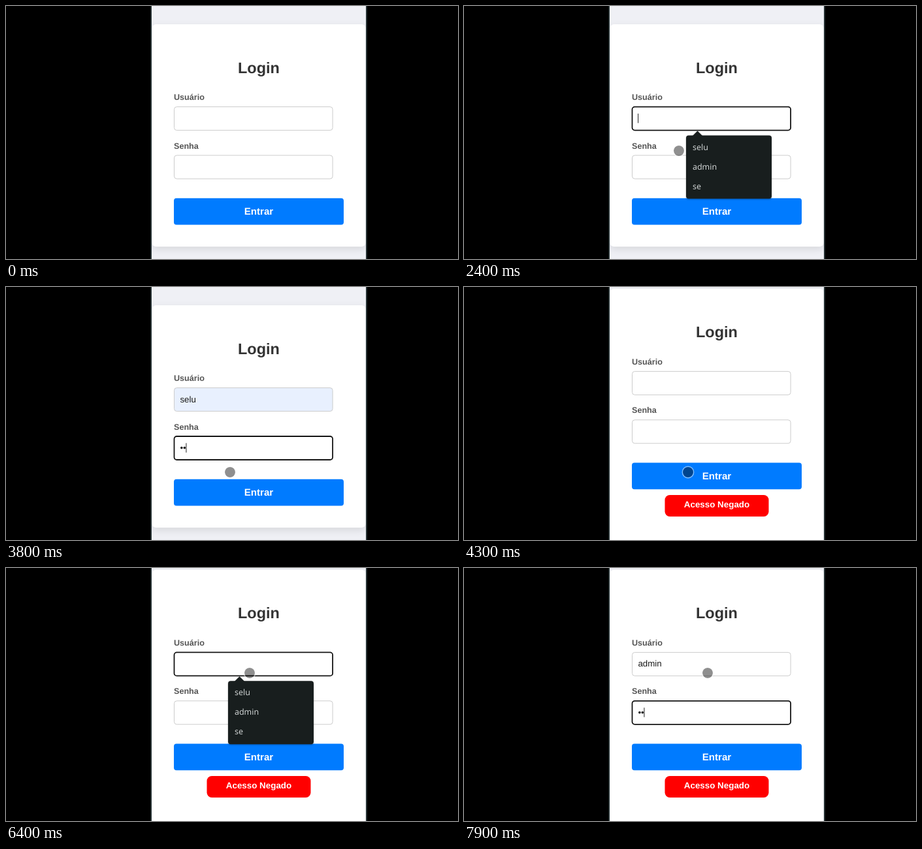
Write an HTML page that moves like this. It is 692 px wide and 388 px high and loops after 8 s.

```html
<!DOCTYPE html>
<html lang="pt-BR">
<head>
<meta charset="utf-8">
<title>Login</title>
<style>
  html, body { margin: 0; height: 100%; overflow: hidden; background: #000; }
  svg { display: block; width: 100vw; height: 100vh; }
  text { font-family: "Liberation Sans", Arial, sans-serif; font-size: 13.3px; fill: #1a1a1a; text-rendering: geometricPrecision; }
  .bold { font-weight: bold; }
  .mid { text-anchor: middle; }
  .label { font-weight: bold; font-size: 12.6px; fill: #555; }
  .card { fill: #fff; filter: drop-shadow(0 4px 6px rgba(0, 0, 0, .1)); }
  .box { fill: #fff; stroke: #ccc; }
  .box.filled { fill: #e8f0fe; }
  .box.focus { stroke: #141414; stroke-width: 1.8; }
  .menu { fill: #181e1e; filter: drop-shadow(0 1px 1px rgba(0, 0, 0, .3)); }
  .menu text, .preview { font-family: "Open Sans", "Noto Sans", sans-serif; font-size: 12.5px; }
  .menu text { fill: #dadede; }
</style>
</head>
<body>
<svg viewBox="0 0 692 388">
  <defs><clipPath id="screen"><path d="M223 0H551V388H223z"/></clipPath></defs>
  <path d="M221.3 0H552.8V388H221.3z" fill="#2d393b"/>
  <g clip-path="url(#screen)">
    <path d="M223 0H551V388H223z" fill="#eff0f5"/>
    <g id="page">
      <rect id="card" class="card" x="223.5" y="28" width="327" height="341" rx="6"/>
      <text class="bold mid" x="387" y="102.7" style="font-size:23.5px;fill:#333">Login</text>
      <text class="label" x="257" y="144.3">Usuário</text>
      <text class="label" x="257" y="218.6">Senha</text>
      <g id="fields"></g>
      <rect x="257" y="294.8" width="260" height="40.6" rx="4" fill="#007bff"/>
      <text class="bold mid" x="387" y="320" style="font-size:15.1px;fill:#fff">Entrar</text>
      <g id="denied">
        <rect x="307.5" y="344.2" width="159" height="33" rx="7.5" fill="#f00"/>
        <text class="bold mid" x="387" y="363.7" style="font-size:13.4px;fill:#fff">Acesso Negado</text>
      </g>
      <path id="caret" stroke="#222" d="M0 0V14.5"/>
    </g>
    <g id="cursor">
      <circle r="8" fill="rgba(0,0,0,.44)"/>
      <circle r="8.7" fill="none" stroke="rgba(255,255,255,.5)" stroke-width="1.4"/>
    </g>
  </g>
  <g id="menu" class="menu">
    <path d="M349.5 199.5L357.5 191.5L365.5 199.5z"/>
    <rect id="panel" x="340" y="198.5" width="131" rx="4"/>
    <g id="rows"></g>
  </g>
</svg>
<script>
const LOOP = 8000, STEP = 100, SHIFT = -25.2;
const names = ["selu", "admin", "se"];
const $ = id => document.getElementById(id);
const show = (node, on) => node.style.display = on ? "" : "none";

function add(parent, tag, attrs) {
  const node = document.createElementNS("http://www.w3.org/2000/svg", tag);
  for (const key in attrs) node.setAttribute(key, attrs[key]);
  return parent.appendChild(node);
}

const makeField = y => ({
  y,
  box: add($("fields"), "rect", { class: "box", x: 257.5, y, width: 242.6, height: 36, rx: 4 }),
  text: add($("fields"), "text", { x: 266.4, y: y + 22 })
});
const user = makeField(154.6), pass = makeField(229);
const rows = names.map((_, i) => add($("rows"), "text", { x: 350, y: 220.7 + 30 * i }));

// Pointer visits: each track lists [time, x, y]; the pointer rests on the last point.
const tracks = [
  { end: 1600, keys: [[500, 511, 175], [700, 455, 173], [900, 399, 170], [1200, 399, 170], [1500, 546, 176]] },
  { end: 4900, keys: [[2100, 331, 235], [2400, 329, 222], [2600, 329, 222], [2900, 332, 248], [3000, 332, 258],
                      [3300, 332, 258], [3400, 343, 284]] },
  { end: LOOP, keys: [[4900, 343, 284], [5100, 349, 262], [5400, 334, 184], [5600, 323, 154],
                      [6000, 323, 154], [6200, 373, 161]] }
];

function pointerAt(t) {
  const track = tracks.find(k => t >= k.keys[0][0] && t < k.end);
  if (!track) return null;
  const next = track.keys.findIndex(k => k[0] > t);
  if (next < 0) return track.keys.at(-1).slice(1);
  const a = track.keys[next - 1], b = track.keys[next], p = (t - a[0]) / (b[0] - a[0]);
  return [a[1] + (b[1] - a[1]) * p, a[2] + (b[2] - a[2]) * p];
}

// Characters typed by time t, one per step.
const typed = (word, start, t) => word.slice(0, Math.max(0, (t - start) / STEP + 1));

function setField(field, text, focused, filled, preview) {
  field.text.textContent = text;
  field.text.setAttribute("class", preview ? "preview" : "");
  field.box.setAttribute("class", "box" + (focused ? " focus" : "") + (filled ? " filled" : ""));
}

function setMenu(list, dy) {
  show($("menu"), list.length);
  $("menu").setAttribute("transform", `translate(0 ${dy})`);
  $("panel").setAttribute("height", 7 + 30 * list.length);
  rows.forEach((row, i) => row.textContent = list[i] || "");
}

function draw(t) {
  const within = (a, b) => t >= a && t < b;
  const failed = t >= 4300, dy = failed ? SHIFT : 0;
  const preview = within(2500, 2700), filled = within(2500, 4300);
  const onUser = within(1000, 3200) || within(5800, 7500);
  const onPass = within(3200, 4300) || t >= 7500;

  $("page").setAttribute("transform", `translate(0 ${dy})`);
  $("card").setAttribute("height", failed ? 400 : 341);
  show($("denied"), failed);
  setField(user, filled ? names[0] : typed("admin", 6900, t), onUser, filled, preview);
  setField(pass, failed ? typed("••", 7800, t) : typed("••••", 3700, t), onPass);

  const field = onUser ? user : pass;
  const blinkOff = within(1600, 2100) || within(6400, 6900);
  show($("caret"), (onUser || onPass) && !blinkOff && !preview);
  const end = field.text.textContent ? field.text.getComputedTextLength() : 0;
  $("caret").setAttribute("transform", `translate(${266.6 + end} ${field.y + 10.4})`);

  const open = within(1100, 2700) || within(5900, 6900);
  setMenu(open ? names : within(6900, 7400) ? ["admin"] : [], dy);

  const at = pointerAt(t);
  show($("cursor"), at);
  if (at) $("cursor").setAttribute("transform", `translate(${at})`);
}

function tick() {
  draw(Math.floor(performance.now() % LOOP / STEP) * STEP);
  requestAnimationFrame(tick);
}
tick();
</script>
</body>
</html>
```
